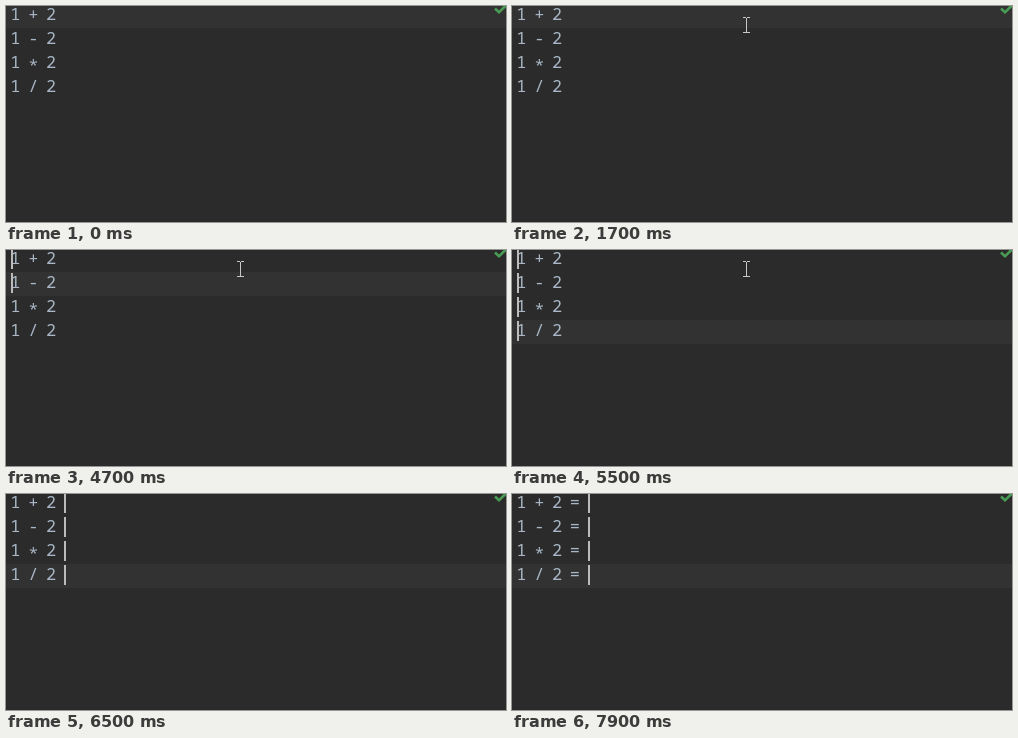
Recreate the animation shown at these times as an HTML page with a canvas. Size 500 px wide and 216 px high, loop 8000 ms.

```html
<!DOCTYPE html>
<html lang="en">
<head>
<meta charset="utf-8">
<title>Multiple carets</title>
<style>
  html, body { margin: 0; width: 100%; height: 100%; overflow: hidden; background: #2b2b2b; }
  canvas { display: block; width: 500px; height: 216px; }
</style>
</head>
<body>
<canvas id="stage" width="500" height="216"></canvas>
<script>
const ctx = document.getElementById('stage').getContext('2d');
const LOOP = 8000;
const LEFT = 5, CELL = 8.9, ROW = 24, BASELINE = 14;
const OPERATORS = ['+', '-', '*', '/'];

// Each entry changes part of the editor state from its time on.
const timeline = [
  [0, { active: 0, carets: 0, column: 0, suffix: '', eye: false, mouse: null }],
  [500, { mouse: [429, 77] }],
  [700, { mouse: [330, 44] }],
  [900, { mouse: [262, 23] }],
  [1100, { mouse: [243, 20], carets: 1, column: 5 }],
  [1500, { mouse: [239, 19], carets: 0 }],
  [1700, { mouse: [234, 19] }],
  [2100, { carets: 1, column: 0 }],
  [2500, { carets: 0 }],
  [3100, { carets: 1 }],
  [3500, { carets: 0 }],
  [4100, { carets: 1 }],
  [4500, { carets: 0 }],
  [4700, { carets: 2, active: 1 }],
  [5300, { carets: 3, active: 2 }],
  [5500, { carets: 4, active: 3 }],
  [5900, { carets: 0 }],
  [6100, { carets: 4, column: 5 }],
  [6300, { column: 6, suffix: ' ', eye: true, mouse: null }],
  [6500, { eye: false }],
  [7100, { column: 7, suffix: ' =', eye: true }],
  [7300, { eye: false }],
  [7500, { carets: 0 }],
  [7700, { carets: 4, column: 8, suffix: ' = ', eye: true }],
  [7900, { eye: false }]
];

function stateAt(time) {
  return Object.assign({}, ...timeline.filter(([at]) => at <= time).map(([, change]) => change));
}

function rect(x, y, w, h, color) {
  ctx.fillStyle = color;
  ctx.fillRect(x, y, w, h);
}

function drawLine(text, row) {
  ctx.fillStyle = '#a9b7c6';
  [...text].forEach((char, col) => {
    const drop = char === '*' ? 4 : 0;
    ctx.fillText(char, LEFT + (col + 0.5) * CELL, BASELINE + row * ROW + drop);
  });
}

function drawMouse([x, y]) {
  const color = '#c8c8c8';
  rect(x, y - 7, 1, 15, color);
  for (const edge of [y - 8, y + 7]) {
    rect(x - 3, edge, 3, 1, color);
    rect(x + 1, edge, 3, 1, color);
  }
}

function drawCheck() {
  ctx.strokeStyle = '#499c54';
  ctx.lineWidth = 2.6;
  ctx.beginPath();
  ctx.moveTo(489, 2.5);
  ctx.lineTo(493, 6.3);
  ctx.lineTo(500, -0.7);
  ctx.stroke();
}

function drawEye() {
  ctx.fillStyle = '#afb1b3';
  ctx.beginPath();
  ctx.moveTo(487.5, 4.5);
  ctx.quadraticCurveTo(494, -4.5, 500.5, 4.5);
  ctx.quadraticCurveTo(494, 13.5, 487.5, 4.5);
  ctx.fill();
  ctx.fillStyle = '#2b2b2b';
  ctx.beginPath();
  ctx.arc(494, 4.5, 3, 0, Math.PI * 2);
  ctx.fill();
  ctx.fillStyle = '#afb1b3';
  ctx.beginPath();
  ctx.arc(494, 4.5, 1.6, 0, Math.PI * 2);
  ctx.fill();
}

function draw(time) {
  const state = stateAt(time);
  rect(0, 0, 500, 216, '#2b2b2b');
  rect(0, state.active * ROW - 2, 500, ROW, '#323232');

  ctx.font = '17px "Noto Sans Mono", monospace';
  ctx.textAlign = 'center';
  OPERATORS.forEach((op, row) => drawLine(`1 ${op} 2${state.suffix}`, row));

  const caretX = Math.round(LEFT + state.column * CELL);
  for (let row = 0; row < state.carets; row++) {
    rect(caretX, row * ROW - 1, 2, 20, '#bbbbbb');
  }
  if (state.eye) drawEye(); else drawCheck();
  if (state.mouse) drawMouse(state.mouse);
}

const start = performance.now();
function tick() {
  draw((performance.now() - start) % LOOP);
  requestAnimationFrame(tick);
}
tick();
</script>
</body>
</html>
```
